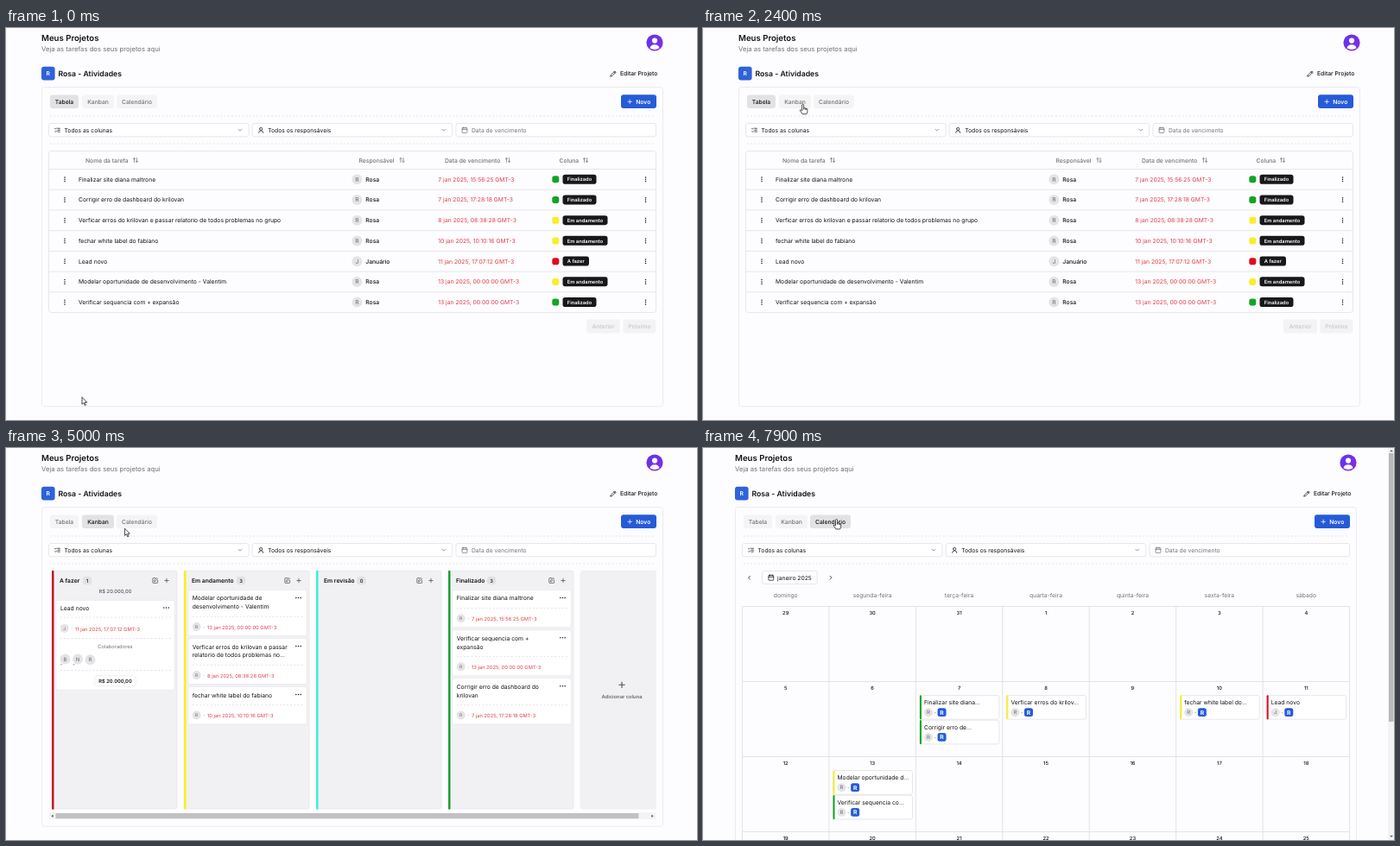
An HTML page for the animation above (8000 ms loop, 800x454 px).

```html
<!DOCTYPE html>
<html lang="pt-BR">
<head>
<meta charset="utf-8">
<title>Meus Projetos</title>
<style>
  html, body { margin: 0; width: 100%; height: 100%; overflow: hidden; background: #fdfcfe; }
  svg { display: block; width: 100vw; height: 100vh; font-family: Inter, "Open Sans", sans-serif; }
</style>
</head>
<body>
<svg id="stage" viewBox="0 0 800 454" text-rendering="geometricPrecision"></svg>
<script>
const LOOP = 8000, STEP = 100, KANBAN_AT = 2800, CALENDAR_AT = 6600;
const INK = '#111114', MUTED = '#71717a', LINE = '#e5e5ea', DATE = '#df3f49', BLUE = '#265bd8';
const SM = 6.75, XS = 5.79;
const GREEN = '#12a523', YELLOW = '#f8ef2a', RED = '#e3091c';

// y is the visual middle of the line
const text = (x, y, s, { size = SM, weight = 400, fill = INK, anchor = 'start' } = {}) =>
  `<text x="${x}" y="${y + size * 0.364}" font-size="${size}" font-weight="${weight}" fill="${fill}" text-anchor="${anchor}">${s}</text>`;
const mid = (x, y, s, o = {}) => text(x, y, s, { ...o, anchor: 'middle' });
const rect = (x, y, w, h, fill, r = 0, stroke = 'none', sw = 0.9) =>
  `<rect x="${x}" y="${y}" width="${w}" height="${h}" rx="${r}" fill="${fill}" stroke="${stroke}" stroke-width="${sw}"/>`;
const path = (d, stroke, sw = 0.9, extra = '') =>
  `<path d="${d}" fill="none" stroke="${stroke}" stroke-width="${sw}" ${extra}/>`;
const dashes = (x1, x2, y) => path(`M${x1} ${y}H${x2}`, '#dedee4', 1, 'stroke-dasharray="1.6 2.6"');
const avatar = (x, y, s, r = 6, size = SM) =>
  `<circle cx="${x}" cy="${y}" r="${r}" fill="#e4e4e7"/>` + mid(x, y, s, { size, fill: '#66666e' });
const dots = (x, y, dx, dy) => [-1, 0, 1].map(i =>
  `<circle cx="${x + i * dx}" cy="${y + i * dy}" r=".75" fill="${INK}"/>`).join('');

const ICONS = {
  pencil: 'M4 16L17 3l4 4L8 20l-6 2zM14 6l4 4',
  list: 'M3 17l2 2 4-4M3 7l2 2 4-4M13 6h8M13 12h8M13 18h8',
  user: 'M7 8a5 5 0 1 0 10 0a5 5 0 1 0-10 0M4 22a8 8 0 0 1 16 0',
  calendar: 'M8 2v4M16 2v4M3 10h18M5 4h14a2 2 0 0 1 2 2v14a2 2 0 0 1-2 2H5a2 2 0 0 1-2-2V6a2 2 0 0 1 2-2z',
  down: 'M6 9l6 6 6-6', left: 'M15 6l-6 6 6 6', right: 'M9 6l6 6-6 6',
  plus: 'M5 12h14M12 5v14',
  sort: 'M3 8l4-4 4 4M7 4v16M21 16l-4 4-4-4M17 20V4',
  edit: 'M12 3H5a2 2 0 0 0-2 2v14a2 2 0 0 0 2 2h14a2 2 0 0 0 2-2v-7M18 3l3 3-9 9-4 1 1-4z'
};
const icon = (name, x, y, color = INK, size = 7.7) =>
  `<g transform="translate(${x - size / 2} ${y - size / 2}) scale(${size / 24})">` +
  path(ICONS[name], color, 2.3, 'stroke-linecap="round" stroke-linejoin="round"') + '</g>';

const TABS = [['Tabela', 51, 33], ['Kanban', 88, 37], ['Calendário', 128, 47]];
const SELECTS = [
  [49.5, 'list', 'Todos as colunas', INK],
  [285.2, 'user', 'Todos os responsáveis', INK],
  [521, 'calendar', 'Data de vencimento', MUTED]
];

function header(active) {
  const tabs = TABS.map(([label, x, w], i) =>
    rect(x, 77.5, w, 15.5, i === active ? '#e2e2e5' : '#f4f4f5', 3) +
    mid(x + w / 2, 85.3, label, { weight: 500, fill: i === active ? INK : MUTED })).join('');
  const selects = SELECTS.map(([x, name, label, fill], i) =>
    rect(x, 110.5, 231.5, 15.3, '#fff', 2.5, LINE) + icon(name, x + 10, 118.2, fill) +
    text(x + 18, 118.2, label, { fill }) + (i < 2 ? icon('down', x + 221.5, 118.2, MUTED) : '')).join('');
  return text(41, 11.3, 'Meus Projetos', { size: 9.64, weight: 600 }) +
    text(41, 24, 'Veja as tarefas dos seus projetos aqui', { size: 7.7, fill: MUTED }) +
    `<circle cx="751" cy="17" r="9.6" fill="url(#purple)"/><circle cx="751" cy="14.6" r="3.1" fill="#fff"/>
     <path d="M745.5 23.3a5.6 5 0 0 1 11 0q-5.5 3.4-11 0z" fill="#fff"/>` +
    rect(41, 44.8, 15.6, 15.8, '#2f62d9', 3) + mid(48.8, 52.7, 'R', { weight: 600, fill: '#fff' }) +
    text(60.5, 52.7, 'Rosa - Atividades', { size: 8.68, weight: 600 }) +
    icon('pencil', 703.2, 52.8) + text(711, 52.8, 'Editar Projeto', { weight: 500 }) +
    rect(41.5, 68.5, 719, active === 2 ? 500 : 369.7, 'none', 3, '#e9e9ed') + tabs +
    rect(712, 77.3, 41, 15.8, BLUE, 3) + icon('plus', 722.2, 85.3, '#fff') +
    text(729.2, 85.3, 'Novo', { weight: 600, fill: '#fff' }) +
    dashes(51, 752, 102) + selects + dashes(51, 752, 134);
}

const BADGES = {
  'Finalizado': [39, GREEN], 'Em andamento': [52, YELLOW], 'A fazer': [30.5, RED]
};
const TASKS = [
  ['Finalizar site diana maltrone', 'Rosa', '7 jan 2025, 15:56:25', 'Finalizado'],
  ['Corrigir erro de dashboard do krilovan', 'Rosa', '7 jan 2025, 17:28:18', 'Finalizado'],
  ['Verficar erros do krilovan e passar relatorio de todos problemas no grupo', 'Rosa', '8 jan 2025, 08:38:28', 'Em andamento'],
  ['fechar white label do fabiano', 'Rosa', '10 jan 2025, 10:10:16', 'Em andamento'],
  ['Lead novo', 'Januário', '11 jan 2025, 17:07:12', 'A fazer'],
  ['Modelar oportunidade de desenvolvimento - Valentim', 'Rosa', '13 jan 2025, 00:00:00', 'Em andamento'],
  ['Verificar sequencia com + expansão', 'Rosa', '13 jan 2025, 00:00:00', 'Finalizado']
];
const dateOf = i => TASKS[i][2] + ' GMT-3';

function tableView() {
  const heads = [['Nome da tarefa', 92, 150], ['Responsável', 408.5, 458.5],
    ['Data de vencimento', 508, 581], ['Coluna', 640.5, 671]].map(([label, x, ix]) =>
    text(x, 153.2, label, { weight: 500, fill: MUTED }) + icon('sort', ix, 153, MUTED, 7.4)).join('');
  const rows = TASKS.map(([name, who, , column], i) => {
    const y = 175.3 + i * 23.72, [w, color] = BADGES[column];
    return path(`M49.5 ${y - 11.8}H752.5`, LINE) + dots(68, y, 0, 2.3) + text(84, y, name) +
      avatar(406.4, y, who[0]) + text(416.3, y, who, { weight: 500 }) +
      text(500.3, y, dateOf(i), { fill: DATE }) + rect(632.3, y - 4, 8, 8, color, 2.8) +
      rect(644.5, y - 5.6, w, 11, '#18181b', 2.8) +
      mid(644.5 + w / 2, y, column, { size: XS, weight: 600, fill: '#fff' }) + dots(740.5, y, 0, 2.3);
  }).join('');
  const pager = [['Anterior', 672, 39], ['Próximo', 714.3, 38.2]].map(([s, x, w]) =>
    rect(x, 337.6, w, 15.8, '#f3f3f5', 3) + mid(x + w / 2, 345.6, s, { weight: 500, fill: '#c6c6cc' })).join('');
  return rect(49.5, 142.5, 703, 187, 'none', 3, LINE) + heads + rows + pager;
}

const COLUMNS = [
  ['A fazer', '#bd1420', 41, []],
  ['Em andamento', '#fbee16', 66, [
    [5, 'Modelar oportunidade de', 'desenvolvimento - Valentim'],
    [2, 'Verficar erros do krilovan e passar', 'relatorio de todos problemas no...'],
    [3, 'fechar white label do fabiano']]],
  ['Em revisão', '#36eedf', 52.5, []],
  ['Finalizado', '#149d2a', 50, [
    [0, 'Finalizar site diana maltrone'],
    [6, 'Verificar sequencia com +', 'expansão'],
    [1, 'Corrigir erro de dashboard do', 'krilovan']]]
];
const cardBox = (x, top, h) => rect(x + 4.7, top, 137.5, h, '#fff', 2.5, '#e9e9ec', 0.7);
const dueLine = (x, y, i) => avatar(x + 14.7, y - 0.5, TASKS[i][1][0], 5, 5) +
  mid(x + 23.3, y - 0.5, '·', { fill: MUTED }) + text(x + 27, y, dateOf(i), { size: XS, fill: DATE });

function stackCards(x, cards) {
  let top = 164.5;
  return cards.map(([task, ...lines]) => {
    const first = top + 9.5, last = first + (lines.length - 1) * 9.75, due = last + 23.8;
    const html = cardBox(x, top, due + 10 - top) +
      lines.map((s, i) => text(x + 9.7, first + i * 9.75, s)).join('') +
      dots(x + 132.5, first - 0.5, 2.7, 0) + dashes(x + 10, x + 138, last + 11.5) + dueLine(x, due, task);
    top = due + 13;
    return html;
  }).join('');
}

function leadCard() {
  return mid(126.5, 166, 'R$ 20.000,00', { size: XS, weight: 500, fill: '#55555e' }) + cardBox(53, 176.3, 104) +
    text(63, 185.6, 'Lead novo') + dots(185.5, 185, 2.7, 0) +
    [196, 220.5, 257.5].map(y => dashes(63, 191, y)).join('') + dueLine(53, 209.4, 4) +
    mid(126.5, 230, 'Colaboradores', { size: XS, fill: MUTED }) +
    avatar(68.5, 244.6, 'B', 6, 6) + avatar(83, 244.6, 'N', 6, 6) + avatar(97.5, 245.3, 'R', 6, 6) +
    path('M63 250.8h2M77.5 250.8h2', '#777', 0.7) + rect(102.7, 263.8, 47.5, 12, '#fff', 2.5, '#ededf0') +
    mid(126.5, 270, 'R$ 20.000,00', { size: XS, weight: 600 });
}

function kanbanView() {
  const columns = COLUMNS.map(([title, color, badge, cards], i) => {
    const x = 53 + i * 153, count = i ? cards.length : 1;
    return rect(x, 142.3, 145, 275.7, '#f1f1f3', 2.5, '#e6e6e9', 0.7) +
      path(`M${x + 1.3} 143V417.5`, color, 2.4, 'stroke-linecap="round"') +
      text(x + 9, 153.6, title, { weight: 600 }) + rect(x + badge - 5.2, 148.7, 10.4, 9.6, '#e2e2e5', 3.5) +
      mid(x + badge, 153.6, count, { size: XS, weight: 500 }) +
      icon('edit', x + 119.7, 153.5, '#4b4b52') + icon('plus', x + 133, 153.5, '#4b4b52') + stackCards(x, cards);
  }).join('');
  return columns + leadCard() +
    path('M752.5 142.3H668a3 3 0 0 0-3 3V415a3 3 0 0 0 3 3H752.5', '#e6e6e9', 0.7) +
    rect(665, 142.3, 87.7, 275.7, '#f1f1f3', 2.5) + icon('plus', 713, 274.3, '#4b4b52', 11) +
    mid(713, 287.8, 'Adicionar coluna', { size: XS, weight: 600, fill: '#66666e' }) +
    rect(49.7, 422.3, 703, 7.6, '#f3f3f4') + rect(57.5, 423, 675, 6.2, '#c1c1c3') +
    '<path d="M54.6 424.4v3.6l-2.2-1.8zM747.4 424.4v3.6l2.2-1.8z" fill="#55555a"/>';
}

const WEEKDAYS = ['domingo', 'segunda-feira', 'terça-feira', 'quarta-feira', 'quinta-feira', 'sexta-feira', 'sábado'];
const EVENTS = [ // weekday, week, slot, colour, label, initial
  [2, 1, 0, GREEN, 'Finalizar site diana...', 'R'],
  [2, 1, 1, GREEN, 'Corrigir erro de...', 'R'],
  [3, 1, 0, YELLOW, 'Verficar erros do krilov...', 'R'],
  [5, 1, 0, YELLOW, 'fechar white label do...', 'R'],
  [6, 1, 0, RED, 'Lead novo', 'J'],
  [1, 2, 0, YELLOW, 'Modelar oportunidade d...', 'R'],
  [1, 2, 1, GREEN, 'Verificar sequencia co...', 'R']
];

function calendarView() {
  const left = 45.5, cell = 100.43, top = 183.5, week = 87;
  let html = icon('left', 53.5, 150.2) + icon('right', 148, 150.2) +
    rect(68.5, 142.5, 63.7, 15, '#fff', 2.5, LINE) + icon('calendar', 78.8, 150) + text(86, 150.2, 'janeiro 2025');
  for (let w = 0; w < 4; w++) html += path(`M${left} ${top + w * week}H${left + 7 * cell}`, '#e0e0e5');
  for (let d = 0; d < 8; d++) html += path(`M${left + d * cell} ${top}V454`, '#e0e0e5');
  WEEKDAYS.forEach((name, d) => {
    const x = left + (d + 0.5) * cell;
    html += mid(x, 170.5, name, { fill: MUTED });
    for (let w = 0; w < 4; w++) {
      const day = w * 7 + d - 2;
      html += mid(x, top + 7.6 + w * week, day < 1 ? day + 31 : day, { size: XS, weight: 500 });
    }
  });
  EVENTS.forEach(([d, w, slot, color, label, initial]) => {
    const x = left + d * cell + 4.6, y = top + w * week + 16 + slot * 28.7;
    html += rect(x, y, 92, 27.7, '#fff', 2.5, LINE) +
      path(`M${x + 1} ${y + 0.8}v26.2`, color, 2, 'stroke-linecap="round"') +
      text(x + 5, y + 8, label) + avatar(x + 10, y + 19.7, initial, 5, 6) + mid(x + 17.8, y + 19.5, '-', { size: XS, fill: MUTED }) +
      rect(x + 20.6, y + 14.8, 10, 9.8, BLUE, 2.5) + mid(x + 25.6, y + 19.7, 'R', { weight: 700, fill: '#fff' });
  });
  return html + rect(793, 0, 7, 454, '#f3f3f4') + rect(794, 6, 5.5, 311, '#b9b9bc') +
    '<path d="M795 4.3h4l-2-2.3zM795 448.7h4l-2 2.3z" fill="#66666b"/>';
}

const stage = document.getElementById('stage');
stage.innerHTML = `
  <defs><linearGradient id="purple" x1="0" y1="0" x2="1" y2="1">
    <stop offset="0" stop-color="#5b35f0"/><stop offset="1" stop-color="#8b2be2"/></linearGradient></defs>
  <rect width="800" height="454" fill="#fdfcfe"/>
  <path d="M.5 0V454" stroke="#f5f4f7"/>
  <g class="view">${header(0)}${tableView()}</g>
  <g class="view">${header(1)}${kanbanView()}</g>
  <g class="view"><g transform="translate(-4 0)">${header(2)}</g>${calendarView()}</g>
  <g id="cursor" stroke="#222" stroke-width=".8" stroke-linejoin="round" fill="#fff">
    <path id="arrow" d="M0 0V8.2L1.9 6.5 3.2 9.6 4.5 9 3.2 6H5.8z"/>
    <path id="hand" d="M-1 .9Q-1-.1 0-.1T1 .9V4.2Q2 3.6 2.6 4.5 3.6 4.1 4 4.9 5.2 4.6 5.2 6V8.2Q5.2 9.6 4.2 11.2H-.6Q-1.6 9.4-3.2 7.4-3.6 6.1-2.4 6.2L-1 7.3zM1 4.2V6M2.6 4.5V6.2M4 4.9V6.4"/>
  </g>`;

const views = [...stage.querySelectorAll('.view')];
const [cursor, arrow, hand] = ['cursor', 'arrow', 'hand'].map(id => document.getElementById(id));

const ROUTE = [ // time, x, y
  [0, 88, 427.5], [200, 70, 415], [450, 25, 330], [900, 52, 215], [1300, 125, 135],
  [1600, 149, 119.8], [1900, 149, 119.8], [2500, 113, 86], [2800, 112, 84.3], [3300, 112, 84.3],
  [3800, 129.5, 94.6], [4700, 129.5, 94.6], [5400, 150, 91], [6000, 156.3, 89.7],
  [6800, 157.7, 89.9], [7300, 157.7, 89.9], [7900, 154.5, 82.7]
];

function cursorAt(t) {
  const next = ROUTE.findIndex(key => key[0] > t);
  if (next < 0) return ROUTE[ROUTE.length - 1].slice(1);
  const [t0, x0, y0] = ROUTE[next - 1], [t1, x1, y1] = ROUTE[next];
  const p = (t - t0) / (t1 - t0), e = p * p * (3 - 2 * p);
  return [x0 + (x1 - x0) * e, y0 + (y1 - y0) * e];
}

const show = (el, on) => el.setAttribute('visibility', on ? 'visible' : 'hidden');

function render(ms) {
  const t = Math.floor((ms % LOOP) / STEP) * STEP;
  const active = t < KANBAN_AT ? 0 : t < CALENDAR_AT ? 1 : 2;
  views.forEach((view, i) => show(view, i === active));
  const [x, y] = cursorAt(t);
  const overTab = y > 77 && y < 93 && x > 51 && x < 175;
  const overSelect = y > 110 && y < 126 && x > 50 && x < 753;
  cursor.setAttribute('transform', `translate(${x} ${y})`);
  show(hand, overTab || overSelect);
  show(arrow, !(overTab || overSelect));
}

const start = performance.now();
function tick() {
  render(performance.now() - start);
  requestAnimationFrame(tick);
}
tick();
</script>
</body>
</html>
```
